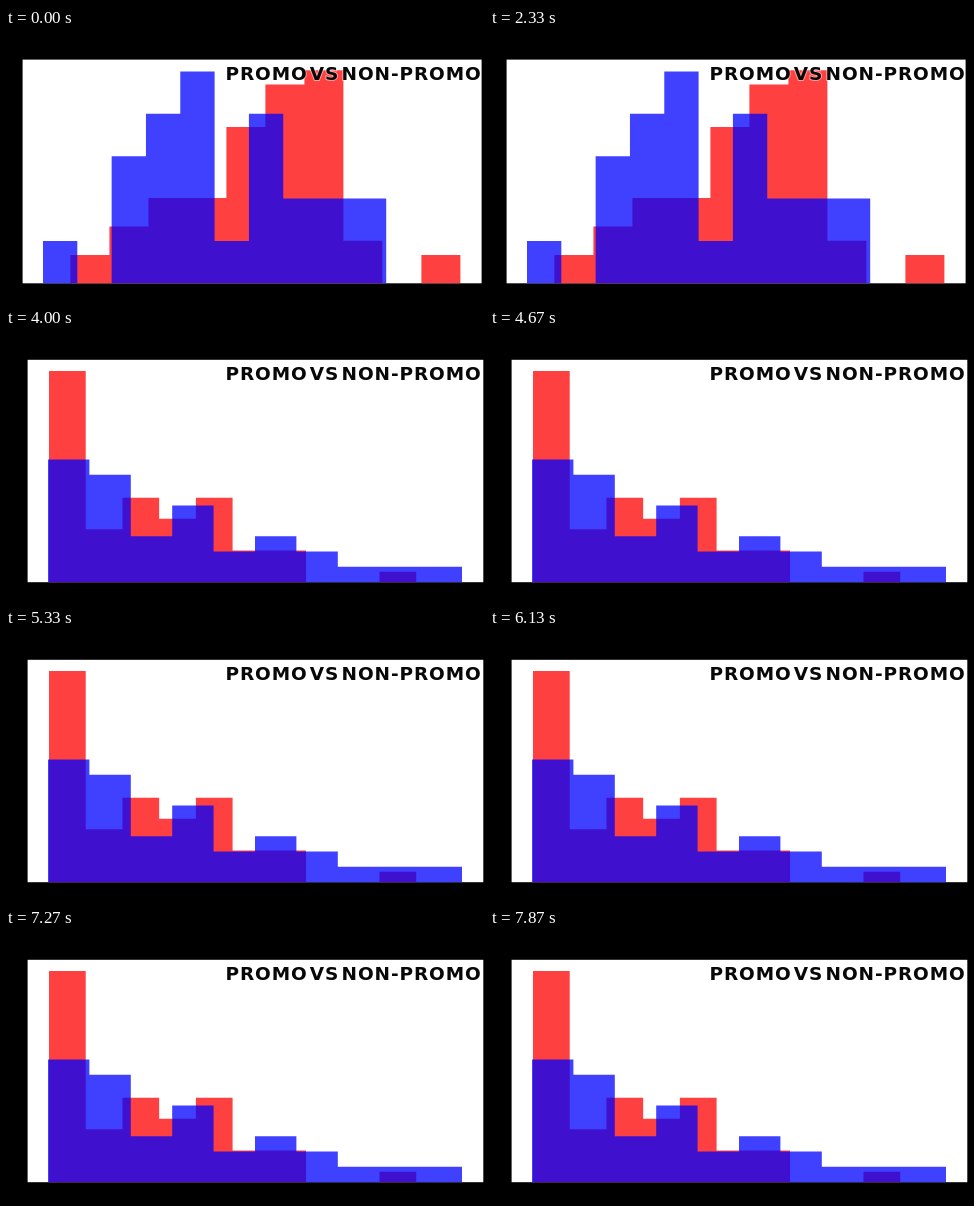
Recreate the animation shown at these times as an HTML page. Size 478 px wide and 272 px high, loop 8000 ms.

```html
<!DOCTYPE html>
<html lang="en">
<head>
<meta charset="utf-8">
<title>Promo vs non-promo</title>
<style>
  html, body { margin: 0; width: 100%; height: 100%; overflow: hidden; background: #000; }
  svg { display: block; width: 478px; height: 272px; }
  path { fill-opacity: .75; }
  .red { fill: #f00; }
  .blue { fill: #00f; }
  .panel { fill: #fff; }
  .title {
    font: 700 18.5px "DejaVu Sans", Inter, sans-serif;
    letter-spacing: .9px;
    fill: #080808;
    stroke: #fff;
    stroke-opacity: .5;
    stroke-width: 2px;
    paint-order: stroke;
  }
  .first { animation: first 8s step-end infinite; }
  .second { animation: second 8s step-end infinite; }
  @keyframes first { 0% { visibility: visible; } 50%, 100% { visibility: hidden; } }
  @keyframes second { 0% { visibility: hidden; } 50%, 100% { visibility: visible; } }
</style>
</head>
<body>
<svg viewBox="0 0 478 272">
  <g class="first">
    <rect class="panel" x="16.6" y="31.6" width="459" height="223.7"/>
  </g>
  <g class="second">
    <rect class="panel" x="21.6" y="31.8" width="455.7" height="222.4"/>
  </g>
  <g class="title">
    <text x="219.5" y="52.2">PROMO</text>
    <text x="303.7" y="52.2">VS</text>
    <text x="335.5" y="52.2">NON-PROMO</text>
  </g>
</svg>
<script>
  // Density histogram: both colours of a chart cover the same area.
  // One outline each, so neighbouring bars leave no seams.
  function histogram(chart, colour, left, right, counts) {
    const total = counts.reduce((sum, n) => sum + n);
    const bin = (right - left) / counts.length;
    const unit = chart.area / (total * bin);
    const bars = counts.map((n, i) => `V${chart.base - n * unit}H${left + (i + 1) * bin}`);
    const path = document.createElementNS("http://www.w3.org/2000/svg", "path");
    path.setAttribute("class", colour);
    path.setAttribute("d", `M${left} ${chart.base}${bars.join("")}V${chart.base}Z`);
    document.querySelector(chart.group).append(path);
  }

  const first = { group: ".first", base: 255.3, area: 34890 };
  histogram(first, "red", 64.4, 454.4, [2, 4, 6, 6, 11, 14, 15, 3, 0, 2]);
  histogram(first, "blue", 37, 380.2, [1, 0, 3, 4, 5, 1, 4, 2, 2, 2]);

  const second = { group: ".second", base: 254.2, area: 20950 };
  histogram(second, "red", 43, 410.2, [20, 5, 8, 6, 8, 3, 3, 0, 0, 1]);
  histogram(second, "blue", 42, 456, [8, 7, 3, 5, 2, 3, 2, 1, 1, 1]);
</script>
</body>
</html>
```
